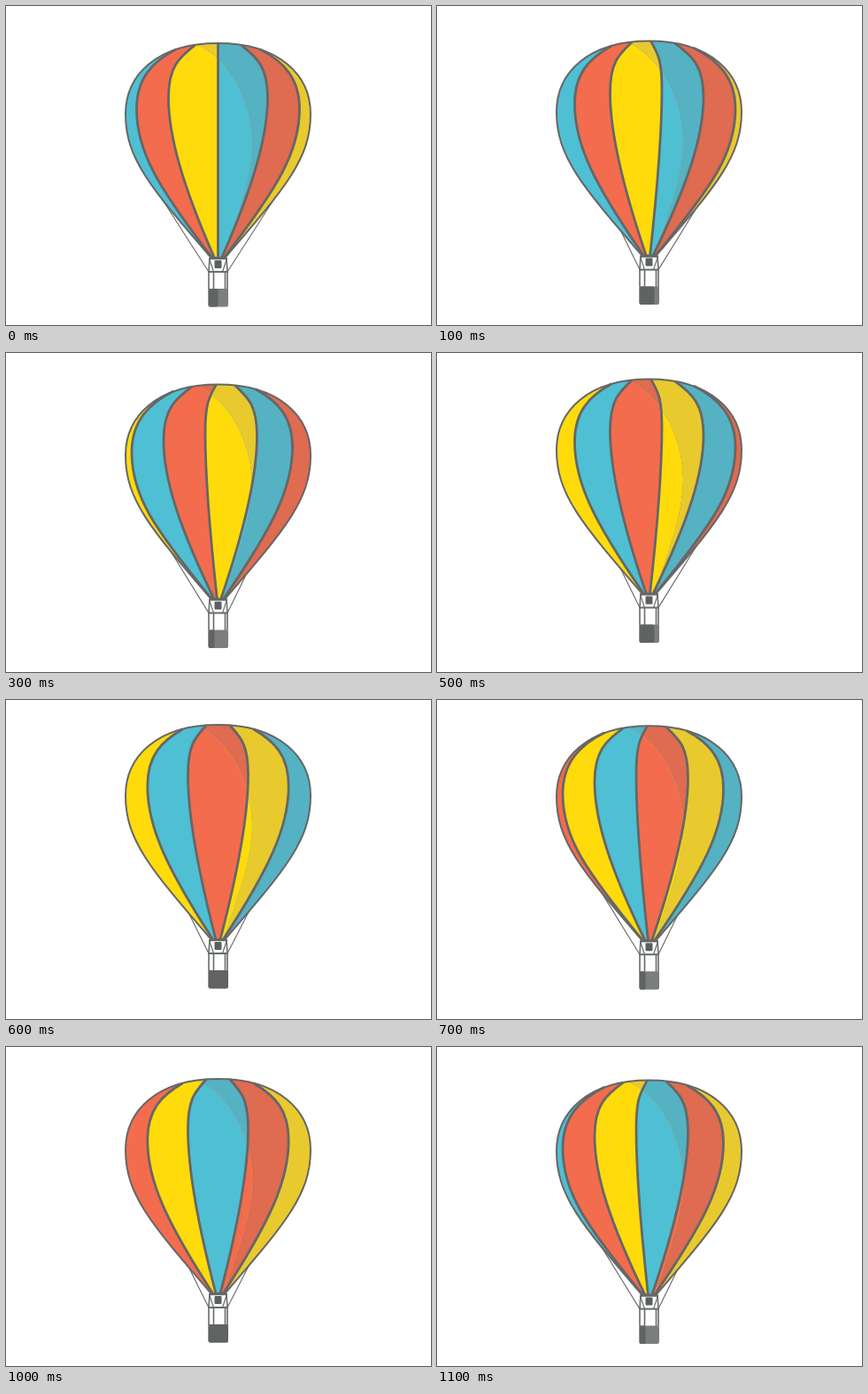
These frames come from a looping animation (480 by 360 pixels, 1.2 s). An HTML page:

```html
<!DOCTYPE html>
<html lang="en">
<head>
<meta charset="utf-8">
<title>Hot-air balloon</title>
<style>
  html, body { margin: 0; width: 100%; height: 100%; overflow: hidden; background: #fff; }
  svg { display: block; width: 100vw; height: 100vh; }
</style>
</head>
<body>
<svg viewBox="0 0 480 360">
  <defs>
    <clipPath id="envelope"><path class="outline"/></clipPath>
    <clipPath id="shadow">
      <path d="M-28 41C18 61 38.500 113 38.500 155C38.500 200 16 250 6 286H120V30H-28Z"/>
    </clipPath>
  </defs>
  <g id="balloon" fill="none" stroke="#666" stroke-linejoin="round">
    <path id="ropes" stroke-width="1.1"/>
    <g stroke-width="1.6" stroke="#666c6a">
      <path d="M-9.5 284L-10.5 300V320M9.5 284L10.5 300V320M-5 300V320M8 300V320"/>
      <path d="M-10 285L-5 300M10 285L5 300" stroke-width="1.2"/>
      <path d="M-11 300H11" stroke-width="2"/>
    </g>
    <g clip-path="url(#envelope)" stroke="none">
      <g id="lit"></g>
      <g id="shaded" clip-path="url(#shadow)"></g>
    </g>
    <path id="ribs" stroke-width="2.8"/>
    <path class="outline" stroke-width="2"/>
    <path d="M-10 285H10" stroke-width="2.4"/>
    <rect x="-4" y="287" width="8" height="9" rx="1" fill="#5c5f5e" stroke="none"/>
    <rect x="-11" y="319" width="22.500" height="20.500" rx="2" fill="#7c7e7d" stroke="none"/>
    <rect id="side" x="-11" y="319" height="20.500" rx="2" fill="#606361" stroke="none"/>
  </g>
</svg>
<script>
const STEP = 100;
const LIT = ['#4fbfd3', '#f36c4d', '#ffdb0b'];
const SHADED = ['#54b2c3', '#df6b51', '#e8ca2e'];
const LIFT = [0, 2.4, 4.5, 6.6, 10, 12.6, 14, 12.8, 10.4, 8, 6, 4.4];
const mirror = list => list.map(x => -x).reverse();

// Rib offsets at the widest point, and where the ropes leave the envelope.
const quarterRibs = [-84, -44, 14.5, 61.5, 97.5];
const quarterRopes = [-33, 56];
const POSES = [
  { ribs: [-92, -56, 0, 56, 92], ropes: [-64, 64], side: 11 },
  { ribs: quarterRibs, ropes: quarterRopes, side: 17 },
  { ribs: [-79.7, -34, 34, 79.7], ropes: [-34, 36], side: 22.5 },
  { ribs: mirror(quarterRibs), ropes: mirror(quarterRopes), side: 7 }
];

const find = id => document.getElementById(id);
const [balloon, ropes, lit, shaded, ribs, side] =
  ['balloon', 'ropes', 'lit', 'shaded', 'ribs', 'side'].map(find);

const outline = 'M0 42C-69 42 -104.5 78 -104.5 122C-104.5 172 -77 204 -8 284' +
  'H8C77 204 104.5 172 104.5 122C104.5 78 69 42 0 42Z';
document.querySelectorAll('.outline').forEach(p => p.setAttribute('d', outline));

const topOf = x => Math.sign(x) * Math.max(0, Math.abs(x) - 11) * 0.58;

function ribPath(x) {
  const top = topOf(x), topY = 42 + 0.003 * top * top;
  const bulge = (x / 104) ** 2;
  const wideY = 96 + 26 * bulge;
  const end = x * 0.075;
  const lowX = end + (x - end) * (0.68 + 0.055 * bulge);
  return `M${top} ${topY}C${top + (x - top) * 0.6} ${topY + 14} ${x} ${wideY - 35} ${x} ${wideY}` +
    `C${x} ${wideY + 40 + 10 * bulge} ${lowX} ${201 + 3 * bulge} ${end} 284`;
}

const ropePath = x =>
  `M${x} ${284 - (Math.abs(x) - 8) * 1.2}L${Math.sign(x) * 10.5} 300`;

// Stacked right to left: each fill covers everything left of its rib.
function gorePaths(offsets, first, colors) {
  const color = k => colors[(first + k) % 3];
  let out = `<path d="${outline}" fill="${color(offsets.length)}"/>`;
  for (let k = offsets.length - 1; k >= 0; k--) {
    const x = offsets[k];
    out += `<path d="${ribPath(x)}H-120V0H${topOf(x)}Z" fill="${color(k)}"/>`;
  }
  return out;
}

function draw(step) {
  const pose = POSES[step % 4];
  const first = (3 - Math.floor((step + 1) / 4)) % 3;
  balloon.setAttribute('transform', `translate(239.5 ${-LIFT[step]})`);
  lit.innerHTML = gorePaths(pose.ribs, first, LIT);
  shaded.innerHTML = gorePaths(pose.ribs, first, SHADED);
  ribs.setAttribute('d', pose.ribs.map(ribPath).join(''));
  ropes.setAttribute('d', pose.ropes.map(ropePath).join(''));
  side.setAttribute('width', pose.side);
}

const start = performance.now();
let shown = -1;
function tick() {
  const step = Math.floor((performance.now() - start) / STEP) % LIFT.length;
  if (step !== shown) draw(shown = step);
  requestAnimationFrame(tick);
}
tick();
</script>
</body>
</html>
```
